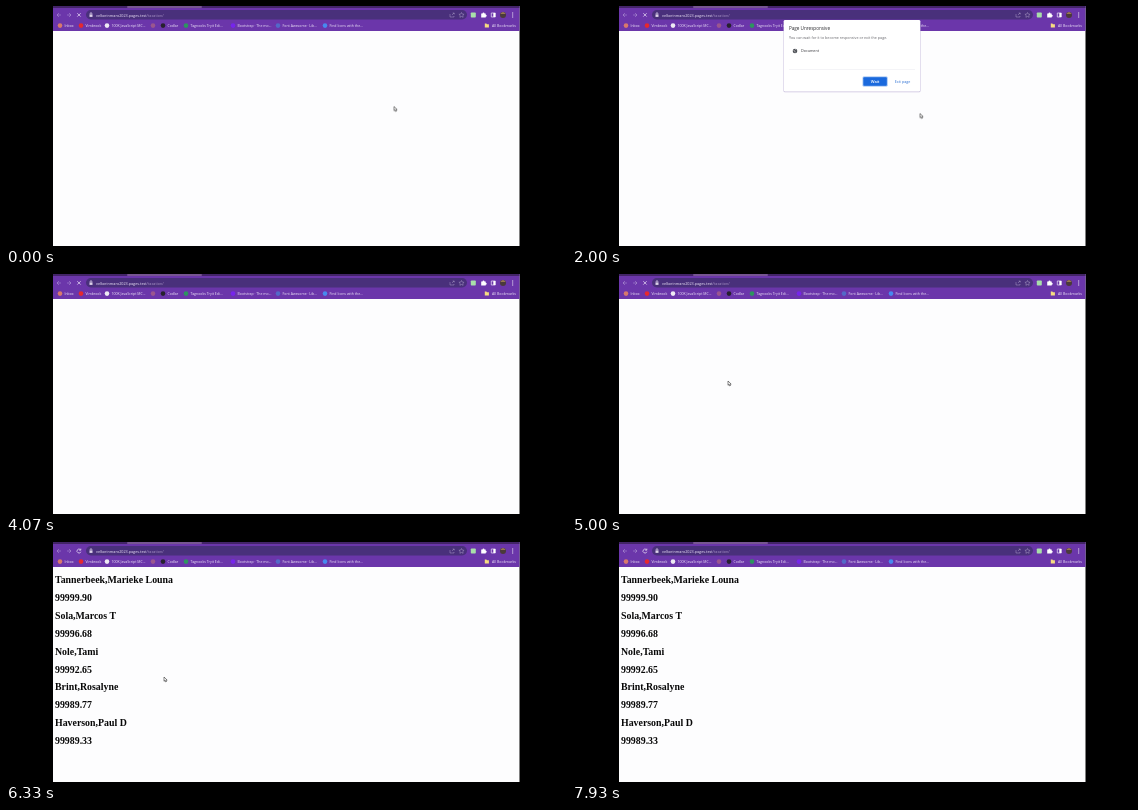
Write an HTML page that moves like this. It is 560 px wide and 240 px high and loops after 8000 ms.

```html
<!DOCTYPE html>
<html lang="en">
<head>
<meta charset="utf-8">
<title>Slow page load</title>
<style>
html, body { margin: 0; width: 100%; height: 100%; overflow: hidden; background: #000; }
svg { display: block; width: 560px; height: 240px; }
text { font-family: "Open Sans", Inter, sans-serif; font-size: 4px; }
.links text, .url { fill: #f0e8fa; }
.line { fill: none; stroke: #f0e8fa; stroke-width: .7; }
.dim { opacity: .4; }
.results text { font: bold 9.87px "Liberation Serif", serif; fill: #080808; }
.loading, .done, .results, .dialog { animation: 8s infinite step-end; }
.loading { animation-name: loading; }
.done, .results { animation-name: done; }
.dialog { animation-name: dialog; }
.cursor { animation: move 8s infinite ease-in-out, seen 8s infinite step-end; }
@keyframes loading { 0% { opacity: 1 } 71%, 100% { opacity: 0 } }
@keyframes done { 0% { opacity: 0 } 71%, 100% { opacity: 1 } }
@keyframes dialog { 0% { opacity: 0 } 16% { opacity: 1 } 39%, 100% { opacity: 0 } }
@keyframes seen { 0% { opacity: 1 } 42% { opacity: 0 } 56% { opacity: 1 } 88%, 100% { opacity: 0 } }
@keyframes move {
  0%, 12% { transform: translate(388px, 100.5px) }
  23%, 26% { transform: translate(348px, 107.5px) }
  35%, 40% { transform: translate(305.5px, 76.5px) }
  56% { transform: translate(185px, 100px) }
  62%, 68% { transform: translate(156px, 107px) }
  77%, 100% { transform: translate(158px, 135px) }
}
</style>
</head>
<body>
<svg viewBox="0 0 560 240">
  <rect width="560" height="240"/>
  <rect x="47" width="466.5" height="240" fill="#fdfdfe"/>

  <rect x="47" width="466.5" height="25" fill="#6b36aa"/>
  <rect x="47" width="466.5" height="2" fill="#432468"/>
  <rect x="121" width="75" height="2" rx="1" fill="#765591"/>
  <rect x="80" y="4" width="381" height="9.5" rx="4.7" fill="#49307b"/>
  <path class="line dim" d="M55 9h-4m2-2l-2 2 2 2M61 9h4m-2-2l2 2-2 2"/>
  <path class="line loading" d="M71.3 7.2l3.4 3.4m0-3.4l-3.4 3.4"/>
  <path class="line done" d="M74.5 7.7a2 2 0 1 0 .4 2M74.8 6.6v1.6h-1.6"/>
  <rect x="83.5" y="8.5" width="3" height="2.4" fill="#ddd2e9"/>
  <path class="line" d="M84.2 8.5v-1a.8.8 0 0 1 1.6 0v1"/>
  <text class="url" x="90" y="10.5" style="font-size:3.75px">velkorinmaro2023.pages.test<tspan fill="#a994c6">/taxation/</tspan></text>

  <path class="line dim" d="M444 8v3h4v-1m-2-1l2-2m-1.3 0h1.6v1.4"/>
  <path class="line dim" d="M455.5 6.5l.8 1.6 1.8.2-1.3 1.2.3 1.8-1.6-.8-1.6.8.3-1.8-1.3-1.2 1.8-.2z"/>
  <rect x="464.8" y="6.5" width="5" height="5" rx=".8" fill="#a8dfa9"/>
  <path d="M475.2 7.5h1.3a1 1 0 0 1 2 0h1.2v1.3a1 1 0 0 1 0 2v.8h-4.5z" fill="#fff"/>
  <path class="line" d="M485.3 7h4v4h-4z"/>
  <path d="M487.3 7h2v4h-2z" fill="#fff"/>
  <circle cx="497" cy="9" r="3" fill="#4b3a3b"/>
  <path d="M494.4 7.7a3 3 0 0 1 5.2 0z" fill="#b38d59"/>
  <path d="M506.7 6.5v1m0 1v1m0 1v1" stroke="#fff"/>
  <g class="links" id="links">
    <path d="M478.8 17.6h1.6l.5.6h2v3.4h-4.1z" fill="#f6dd81"/>
    <text x="486" y="21.1" style="font-size:3.6px">All Bookmarks</text>
  </g>

  <g class="results" id="results"></g>

  <g class="dialog">
    <rect x="211.5" y="14" width="137" height="72.3" rx="1.5" fill="#c9c0dd"/>
    <rect x="212" y="14" width="136" height="71.5" rx="1.2" fill="#fff"/>
    <text x="217" y="24.4" fill="#29292d" style="font-size:4.6px">Page Unresponsive</text>
    <text x="217" y="33.1" fill="#65656a" style="font-size:3.7px">You can wait for it to become responsive or exit the page.</text>
    <path d="M217 63.5h126" stroke="#ededf1" stroke-width=".6"/>
    <circle cx="223" cy="45" r="2.3" fill="#4a4d52"/>
    <path d="M221.3 44.2l1.5.7.4 1.6M223.3 43.2l.8 1" fill="none" stroke="#e6e6e8" stroke-width=".6"/>
    <text x="229" y="46.4" fill="#333338" style="font-size:3.7px">Document</text>
    <rect x="290.6" y="70.4" width="25" height="10.2" rx="1.4" fill="#8db6ef"/>
    <rect x="291.4" y="71.2" width="23.4" height="8.6" rx="1" fill="#1a69dd"/>
    <text x="303.1" y="77" text-anchor="middle" fill="#fff" font-weight="600">Wait</text>
    <text x="330.5" y="77" text-anchor="middle" fill="#2b6fd3" style="font-size:3.7px">Exit page</text>
  </g>

  <path class="cursor" d="M0 0v4.3l1-.9.7 1.5.8-.4-.7-1.4h1.4z" fill="#fff" stroke="#222" stroke-width=".55"/>
</svg>
<script>
const add = (parent, tag, attrs, label) => {
  const node = document.createElementNS(parent.namespaceURI, tag);
  for (const [key, value] of Object.entries(attrs)) node.setAttribute(key, value);
  if (label) node.textContent = label;
  parent.append(node);
};

const bookmarks = [
  [54, '#d8796c', 'Inbox'],
  [75, '#e6282e', 'Vimbrook'],
  [101, '#eeeaf3', '100K JavaScript MC...'],
  [147, '#9a568f', ''],
  [157, '#26212e', 'Codlar'],
  [180, '#2d9460', 'Tagnooks Tryit Edi...'],
  [227, '#7625ec', 'Bootstrap · The mo...'],
  [272, '#5369c8', 'Font Awesome · Lib...'],
  [319, '#4789ef', 'Find Icons with the...']
];
const links = document.getElementById('links');
for (const [x, fill, label] of bookmarks) {
  add(links, 'circle', { cx: x, cy: 19.6, r: 2.3, fill });
  add(links, 'text', { x: x + 4.5, y: 21.1, style: 'font-size:3.5px' }, label);
}

const rows = [
  'Tannerbeek,Marieke Louna', '99999.90',
  'Sola,Marcos T', '99996.68',
  'Nole,Tami', '99992.65',
  'Brint,Rosalyne', '99989.77',
  'Haverson,Paul D', '99989.33'
];
const results = document.getElementById('results');
rows.forEach((row, i) => add(results, 'text', { x: 49, y: 41 + i * 17.9 }, row));
</script>
</body>
</html>
```
